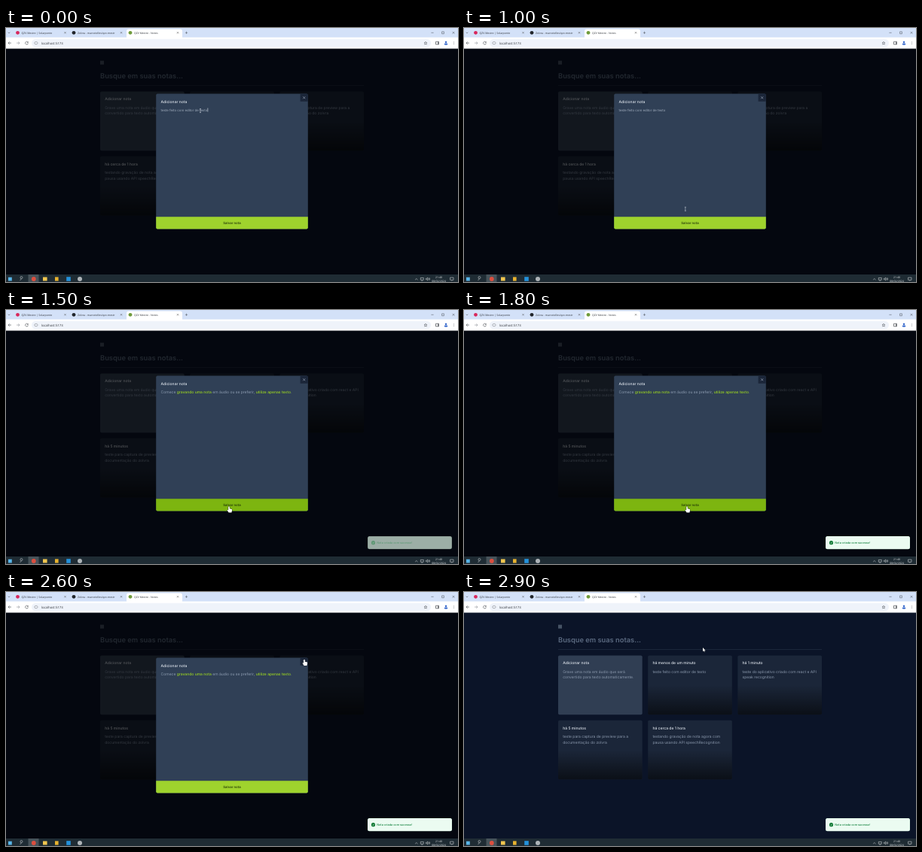
An HTML page with a canvas that plays this animation: 600x338 px, repeating every 3 s.

```html
<!DOCTYPE html>
<html lang="pt-BR">
<head>
<meta charset="utf-8">
<title>Notas</title>
<style>
html, body { margin: 0; width: 100%; height: 100%; overflow: hidden; background: #0b1428; }
canvas { display: block; }
</style>
</head>
<body>
<canvas id="stage" width="600" height="338"></canvas>
<script>
const ctx = document.getElementById('stage').getContext('2d');
const LOOP = 3000, STEP = 100;
const CLICKED = 1400, SAVED = 1500, CLOSED = 2800;
const INTER = 'Inter, sans-serif', SYSTEM = '"Open Sans", sans-serif';

const addCard = ['Adicionar nota', 'Grave uma nota em áudio que será', 'convertido para texto automaticamente.'];
const newNote = ['há menos de um minuto', 'teste feito com editor de texto'];
const oldNotes = [
  ['há 1 minuto', 'teste do aplicativo criado com react e API', 'speak recognition'],
  ['há 5 minutos', 'teste para captura de preview para a', 'documentação do zolvra'],
  ['há cerca de 1 hora', 'testando gravação de nota agora com', 'pausa usando API speechRecognition'],
];

// Pointer tip: time, x, y
const route = [
  [0, 258, 110], [600, 258, 110], [1100, 298, 256], [1200, 296, 261.3], [1900, 296, 261.3],
  [2400, 399, 79], [2500, 396, 88.5], [2600, 396, 89.7], [2700, 396, 89.7],
  [2800, 373.4, 85.3], [2900, 317, 74],
];

function rect(x, y, w, h, fill, r = 0) {
  ctx.fillStyle = fill;
  ctx.beginPath();
  ctx.roundRect(x, y, w, h, r);
  ctx.fill();
}

function dot(x, y, r, fill) {
  ctx.fillStyle = fill;
  ctx.beginPath();
  ctx.arc(x, y, r, 0, 7);
  ctx.fill();
}

function stroke(d, x, y, color, width = 0.5) {
  ctx.save();
  ctx.translate(x, y);
  ctx.strokeStyle = color;
  ctx.lineWidth = width;
  ctx.stroke(new Path2D(d));
  ctx.restore();
}

function text(s, x, y, size, color, weight = 400, family = INTER, align = 'left') {
  ctx.font = `${weight} ${size}px ${family}`;
  ctx.textRendering = 'geometricPrecision';
  ctx.textAlign = align;
  ctx.fillStyle = color;
  ctx.fillText(s, x, y);
  return x + ctx.measureText(s).width;
}

const cross = (x, y, r, color, width) =>
  stroke(`M${-r} ${-r}L${r} ${r}M${r} ${-r}L${-r} ${r}`, x, y, color, width);

function pointerAt(t) {
  const i = route.findIndex(p => p[0] > t);
  if (i < 0) return route.at(-1).slice(1);
  const [t0, x0, y0] = route[i - 1], [t1, x1, y1] = route[i];
  const u = (t - t0) / (t1 - t0), k = u * u * (3 - 2 * u);
  return [x0 + (x1 - x0) * k, y0 + (y1 - y0) * k];
}

function drawTab(x, icon, label, active) {
  if (active) rect(x - 5, 1.5, 74, 14, '#fff', 3);
  dot(x, 6.3, 2.4, icon);
  text(label, x + 5, 7.6, 3.5, '#30343a', 400, SYSTEM);
  cross(x + 63, 6.3, 1.1, '#444', 0.5);
}

function drawBrowser() {
  const ink = '#454a50';
  rect(0, 0, 600, 13, '#d3e1f8');
  stroke('M-1.2 -.6L0 .6L1.2 -.6', 4, 6.3, ink, 0.6);
  drawTab(15.5, '#d8275c', 'QZV Mestre | Solarponte');
  drawTab(90, '#22262b', 'Zolvra - marcotelles/qzv-mestr');
  drawTab(165, '#6f9b3c', 'QZV Mestre - Notes', true);
  stroke('M-1.6 0H1.6M0 -1.6V1.6', 239.5, 6.3, ink);
  stroke('M-1.6 0H1.6', 566, 6.3, ink);
  stroke('M-1.4 -1.4H1.4V1.4H-1.4Z', 580, 6.3, ink);
  cross(594, 6.3, 1.4, ink);

  rect(0, 12.5, 600, 15, '#fff');
  rect(34, 14.8, 530, 10.4, '#eff3fa', 5.2);
  stroke('M2 0H-2M-.3 -1.7L-2 0L-.3 1.7', 5, 20, ink, 0.6);
  stroke('M-2 0H2M.3 -1.7L2 0L.3 1.7', 16, 20, '#8a8f95', 0.6);
  stroke('M1.6 -1A1.9 1.9 0 1 0 1.9 .4M1.8 -2V-.7H.5', 27.5, 20, ink, 0.6);
  stroke('M-1.1 -1.4A1.4 1.6 0 1 1 -1.1 1.4A1.4 1.6 0 1 1 -1.1 -1.4', 41, 20, '#60656b');
  text('localhost:5173', 46.8, 21.5, 4.3, '#30343a', 400, SYSTEM);
  stroke('M0 -2L.6 -.6L2 -.5L.9 .5L1.3 2L0 1.1L-1.3 2L-.9 .5L-2 -.5L-.6 -.6Z', 557, 20, ink);
  stroke('M-2 -1.8H2V1.8H-2ZM1 -1.8V1.8', 572.5, 20, ink, 0.7);
  dot(584, 18.8, 1.2, '#2e62c9');
  rect(581.8, 20.4, 4.4, 2, '#2e62c9', 1);
  for (const y of [18.4, 20, 21.6]) dot(594.5, y, 0.4, ink);
}

function drawTaskbar() {
  const light = '#e6eaec';
  rect(0, 328, 600, 10, '#1f2c34');
  rect(29.5, 328, 14, 10, '#47535a');
  rect(3, 331.7, 4.8, 4.8, '#58b5e8');
  stroke('M.4 -.4A1.5 1.5 0 1 1 1.5 -1.2A1.5 1.5 0 0 1 .4 -.4L-1.8 2', 20.3, 334, light);
  dot(36.8, 334, 2.9, '#dc4f3f');
  rect(49, 331.5, 5.6, 5, '#f0c64f');
  rect(65, 331.4, 4.6, 5.2, '#e8b32f');
  rect(80.2, 331.2, 5.6, 5.6, '#2492dc');
  dot(98, 334.1, 3, '#aeb4b8');
  stroke('M-1.7 .8L0 -.8L1.7 .8', 544.8, 334.3, light);
  stroke('M-2 -1.6H2V1.2H-2ZM-1 2.2H1', 552.3, 334, light);
  stroke('M-2.4 -.7H-1.4L0 -2V2L-1.4 .7H-2.4ZM1 -1A1.5 1.5 0 0 1 1 1M2 -1.8A2.5 2.5 0 0 1 2 1.8', 559.8, 334, light);
  text('21:40', 574.5, 332.7, 3.5, light, 400, SYSTEM, 'center');
  text('08/02/2024', 574.5, 337.8, 3.5, light, 400, SYSTEM, 'center');
  stroke('M-2.2 -1.9H2.2V1.3H.7L0 2.3V1.3H-2.2Z', 591.8, 334, light);
}

function drawCard([title, ...lines], i, hovered) {
  const w = 111.67, h = 78.8;
  const x = 125 + (i % 3) * 119.17, y = 84.4 + Math.floor(i / 3) * 86.3;
  rect(x, y, w, h, i ? '#1b2639' : '#303e53', 1.9);
  text(title, x + 6.25, y + 12, 5, '#dfe5ed', 500);
  lines.forEach((line, n) => text(line, x + 6.25, y + 23.4 + n * 7.6, 5, '#8a98ac'));
  if (i) {
    const shade = ctx.createLinearGradient(0, y + h / 2, 0, y + h);
    shade.addColorStop(0, 'rgba(0,0,0,0)');
    shade.addColorStop(1, 'rgba(0,0,0,.6)');
    rect(x, y + h / 2, w, h / 2, shade, [0, 0, 1.9, 1.9]);
  }
  if (hovered) {
    ctx.strokeStyle = '#56657a';
    ctx.lineWidth = 0.7;
    ctx.beginPath();
    ctx.roundRect(x, y, w, h, 1.9);
    ctx.stroke();
  }
}

function drawPage(t) {
  rect(0, 27, 600, 301, '#0b1428');
  rect(125, 43.6, 5, 5, '#465365');
  text('Busque em suas notas...', 125, 66.7, 9.3, '#5b6a80', 600);
  rect(125, 76.2, 350, 0.6, '#2c394d');
  const cards = t < SAVED ? [addCard, ...oldNotes] : [addCard, newNote, ...oldNotes];
  cards.forEach((card, i) => drawCard(card, i, i === 2 && t === CLOSED));
}

function drawModal(t, pointerY) {
  const x = 199.2, y = 87.5, w = 201.6, h = 180;
  const lime = '#9ad321', muted = '#8e9db2', textX = 205.6, textY = 110.8;
  rect(0, 27, 600, 301, 'rgba(0,0,0,.63)');
  rect(x, y, w, h, '#304056', 1.9);
  rect(390.6, y, 10.2, 10.2, '#1b2639', [0, 1.9, 0, 0]);
  cross(395.7, 92.7, 1.5, t >= 2500 ? '#f1f5f9' : '#a7b3c3', 0.6);
  text('Adicionar nota', textX, 99.6, 5, '#dfe5ed', 500);

  if (t < SAVED) {
    const end = text('teste feito com editor de texto', textX, textY, 4.375, '#a3afbf');
    if (t < 600 || (t >= 1100 && t < CLICKED)) rect(end + 0.3, 106.6, 0.6, 5, '#dfe5ed');
  } else {
    [['Comece ', muted, 400], ['gravando uma nota', lime, 500], [' em áudio ou se preferir, ', muted, 400],
      ['utilize apenas texto', lime, 500], ['.', muted, 400]]
      .reduce((at, [s, color, weight]) => text(s, at, textY, 5, color, weight), textX);
  }

  rect(x, 251.3, w, 16.2, pointerY > 251 ? '#7db510' : '#9fd32d', [0, 0, 1.9, 1.9]);
  text('Salvar nota', 300, 261, 4.375, '#1c3006', 500, INTER, 'center');
}

function drawToast(t) {
  const u = Math.min(1, Math.max(0, (t - CLICKED) / 400));
  if (!u) return;
  ctx.globalAlpha = 1 - (1 - u) ** 2;
  rect(480, 301, 112, 17.2, '#d3f7e0', 2.5);
  rect(480.3, 301.3, 111.4, 16.6, '#ebfbf1', 2.3);
  dot(487.5, 309.7, 2.6, '#137a36');
  stroke('M-1.1 .1L-.3 .9L1.1 -.8', 487.5, 309.7, '#ebfbf1', 0.6);
  text('Nota criada com sucesso!', 492.2, 311.1, 3.8, '#168440', 500);
  ctx.globalAlpha = 1;
}

function drawPointer(t, x, y) {
  if (t < 1100) {
    stroke('M-1 -2.5H1M0 -2.5V2.5M-1 2.5H1', x, y, '#c3cad3', 0.6);
    return;
  }
  const onButton = y > 251, onClose = t >= 2500 && t < CLOSED;
  const hand = 'M-.8 .6Q0 -.6 .8 .6V3L3.4 3.6Q4.3 4 4.1 5.2L3.4 8.2H-.4L-2.4 5.2Q-2.4 4 -.8 5Z';
  const arrow = 'M0 0V5L1.2 4L2 5.7L2.8 5.3L2 3.7H3.6Z';
  const shape = new Path2D(onButton || onClose || t === CLOSED ? hand : arrow);
  ctx.save();
  ctx.translate(x, y);
  ctx.lineWidth = 0.7;
  ctx.strokeStyle = '#10151c';
  ctx.stroke(shape);
  ctx.fillStyle = '#fff';
  ctx.fill(shape);
  ctx.restore();
}

function frame(now) {
  const t = Math.floor((now % LOOP) / STEP) * STEP;
  const [x, y] = pointerAt(t);
  drawPage(t);
  if (t < CLOSED) drawModal(t, y);
  drawToast(t);
  drawBrowser();
  drawTaskbar();
  drawPointer(t, x, y);
  requestAnimationFrame(frame);
}
requestAnimationFrame(frame);
</script>
</body>
</html>
```
